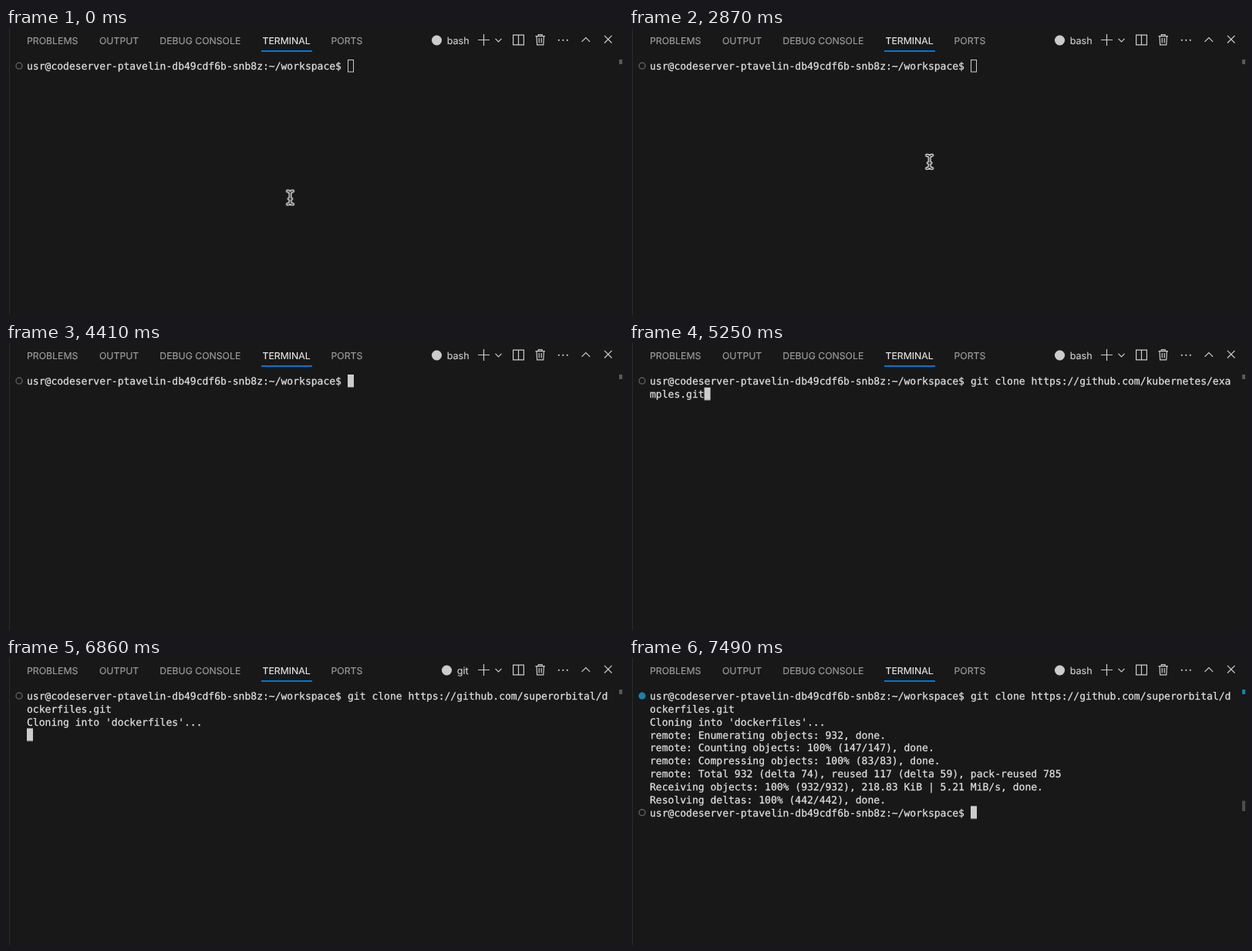
These frames come from a looping animation (800 by 373 pixels, 8000 ms). An HTML page:

```html
<!DOCTYPE html>
<html lang="en">
<head>
<meta charset="utf-8">
<title>Terminal: git clone</title>
<style>
html, body { margin: 0; width: 100%; height: 100%; overflow: hidden; background: #181818; }
svg { display: block; width: 100%; height: 100%; }
text { white-space: pre; text-rendering: geometricPrecision; }
.tabs { font: 12.25px Inter, sans-serif; fill: #9d9d9d; stroke: #9d9d9d; stroke-width: .15; }
.tabs .active { fill: #e7e7e7; stroke: #e7e7e7; }
.title { font: 12.6px Inter, sans-serif; fill: #cccccc; stroke: #cccccc; stroke-width: .15; }
.term { font: 13.04px "DejaVu Sans Mono", monospace; fill: #e0e0e0; stroke: #e0e0e0; stroke-width: .25; }
.icons { fill: none; stroke: #cccccc; stroke-width: 1.2; }
.idle { fill: none; stroke: #6a6a6a; stroke-width: 1.2; }
.done { fill: #1b81a8; }

/* every part shares one clock */
.step { animation: 8s step-end -10ms infinite; }
.unfocused { animation-name: unfocused; }
.block { animation-name: block; }
.first { animation-name: first; }
.second { animation-name: second; }
.cloning { animation-name: cloning; }
.remote { animation-name: remote; }
.received { animation-name: received; }
.prompt { animation-name: prompt; }
.running { animation-name: running; }
.bash { animation-name: bash; }
.git { animation-name: git; }
.pointer {
  fill: none; stroke-linecap: round;
  animation: move 8s linear -10ms infinite, hide 8s step-end -10ms infinite;
}

@keyframes unfocused { 0% { visibility: visible } 42% { visibility: hidden } }
@keyframes first { 0%, 69.125% { visibility: hidden } 56% { visibility: visible } }
@keyframes second { 0% { visibility: hidden } 69.125% { visibility: visible } }
@keyframes cloning { 0% { visibility: hidden } 83.125% { visibility: visible } }
@keyframes remote { 0% { visibility: hidden } 86.625% { visibility: visible } }
@keyframes received { 0% { visibility: hidden } 87.5% { visibility: visible } }
@keyframes prompt { 0% { visibility: hidden } 88.375% { visibility: visible } }
@keyframes running { 0% { visibility: visible } 88.375% { visibility: hidden } }
@keyframes bash { 0%, 89.25% { visibility: visible } 84.875% { visibility: hidden } }
@keyframes git { 0%, 89.25% { visibility: hidden } 84.875% { visibility: visible } }
@keyframes hide { 0% { visibility: visible } 55.125% { visibility: hidden } }
@keyframes block {
  0% { visibility: hidden; transform: translate(443px, 41px) }
  42% { visibility: visible; transform: translate(443px, 41px) }
  56% { visibility: visible; transform: translate(97.6px, 57.8px) }
  69.125% { visibility: visible; transform: translate(136.9px, 57.8px) }
  83.125% { visibility: visible; transform: translate(27px, 91.4px) }
  86.625% { visibility: visible; transform: translate(27px, 142px) }
  87.5% { visibility: visible; transform: translate(27px, 192.4px) }
  88.375%, 100% { visibility: visible; transform: translate(443px, 192.4px) }
}
@keyframes move {
  0% { transform: translate(368.5px, 220.5px) }
  32.375% {
    transform: translate(368.5px, 220.5px);
    animation-timing-function: cubic-bezier(.333, .667, .667, 1);
  }
  40.25%, 100% { transform: translate(398.2px, 154.8px) }
}
</style>
</head>
<body>
<svg viewBox="0 0 800 373" xmlns="http://www.w3.org/2000/svg">
  <rect width="800" height="373" fill="#181818"/>
  <rect x="4" width="1" height="373" fill="#2b2b2b"/>

  <g class="tabs">
    <text x="27" y="20.6">PROBLEMS</text>
    <text x="121" y="20.6">OUTPUT</text>
    <text x="199.3" y="20.6">DEBUG CONSOLE</text>
    <text x="332.5" y="20.6" class="active">TERMINAL</text>
    <text x="421.5" y="20.6">PORTS</text>
  </g>
  <rect x="331" y="29" width="66" height="2" fill="#0078d4"/>

  <g class="title step bash">
    <circle cx="558.5" cy="16" r="6.5"/>
    <text x="571.7" y="20.6">bash</text>
  </g>
  <g class="title step git">
    <circle cx="571.5" cy="16" r="6.5"/>
    <text x="584.8" y="20.6">git</text>
  </g>

  <g class="icons">
    <path d="M612 15.5h15M619.5 8v15"/>
    <path d="M634.5 13.8l4 4 4-4"/>
    <path d="M657.6 9.1h13.8v12.8h-13.8zM664.5 9v13"/>
    <path d="M686.5 10.6h12.4M690.3 10.4v-1.8h4.8v1.8M688 10.8l.6 11h8.2l.6-11M691.2 13v6.5M694.2 13v6.5"/>
    <path d="M746.5 17.8l5.3-5.3 5.3 5.3"/>
    <path d="M775.9 9.9l9.6 9.6M785.5 9.9l-9.6 9.6"/>
  </g>
  <g fill="#cccccc">
    <circle cx="716.8" cy="15.8" r="1.1"/>
    <circle cx="722.3" cy="15.8" r="1.1"/>
    <circle cx="727.8" cy="15.8" r="1.1"/>
  </g>

  <g class="step running">
    <circle class="idle" cx="17" cy="49.2" r="4"/>
    <rect x="795" y="41" width="4" height="6" fill="#5a5a5a"/>
  </g>
  <g class="step prompt">
    <circle class="done" cx="17" cy="49.2" r="4.6"/>
    <rect class="done" x="795" y="41" width="4" height="6"/>
    <circle class="idle" cx="17" cy="200.8" r="4"/>
    <rect x="795" y="185.5" width="4" height="13.5" fill="#4d4d4d"/>
  </g>

  <rect class="step unfocused" x="443.5" y="41.5" width="7" height="15.5" fill="none" stroke="#cccccc"/>
  <rect class="step block" width="8" height="16.5" fill="#cccccc"/>

  <g class="term">
    <text id="ps" x="27" y="54">usr@codeserver-ptavelin-db49cdf6b-snb8z:~/workspace$</text>
    <g class="step first">
      <text x="443" y="54">git clone https://github.com/kubernetes/exa</text>
      <text x="27" y="70.8">mples.git</text>
    </g>
    <g class="step second">
      <text x="443" y="54">git clone https://github.com/superorbital/d</text>
      <text x="27" y="70.8">ockerfiles.git</text>
    </g>
    <text class="step cloning" x="27" y="87.7">Cloning into 'dockerfiles'...</text>
    <g class="step remote">
      <text x="27" y="104.5">remote: Enumerating objects: 932, done.</text>
      <text x="27" y="121.3">remote: Counting objects: 100% (147/147), done.</text>
      <text x="27" y="138.2">remote: Compressing objects: 100% (83/83), done.</text>
    </g>
    <g class="step received">
      <text x="27" y="155">remote: Total 932 (delta 74), reused 117 (delta 59), pack-reused 785</text>
      <text x="27" y="171.8">Receiving objects: 100% (932/932), 218.83 KiB | 5.21 MiB/s, done.</text>
      <text x="27" y="188.7">Resolving deltas: 100% (442/442), done.</text>
    </g>
    <use class="step prompt" href="#ps" y="151.5"/>
  </g>

  <defs>
    <path id="beam" d="M-3.6-8.5Q0-8.5 0-5V5Q0 8.5-3.6 8.5M3.6-8.5Q0-8.5 0-5M0 5Q0 8.5 3.6 8.5M-1.8 1.5h3.6"/>
  </defs>
  <g class="pointer">
    <use href="#beam" stroke="#ffffff" stroke-width="3.8"/>
    <use href="#beam" stroke="#111111" stroke-width="1.3"/>
  </g>
</svg>
</body>
</html>
```
